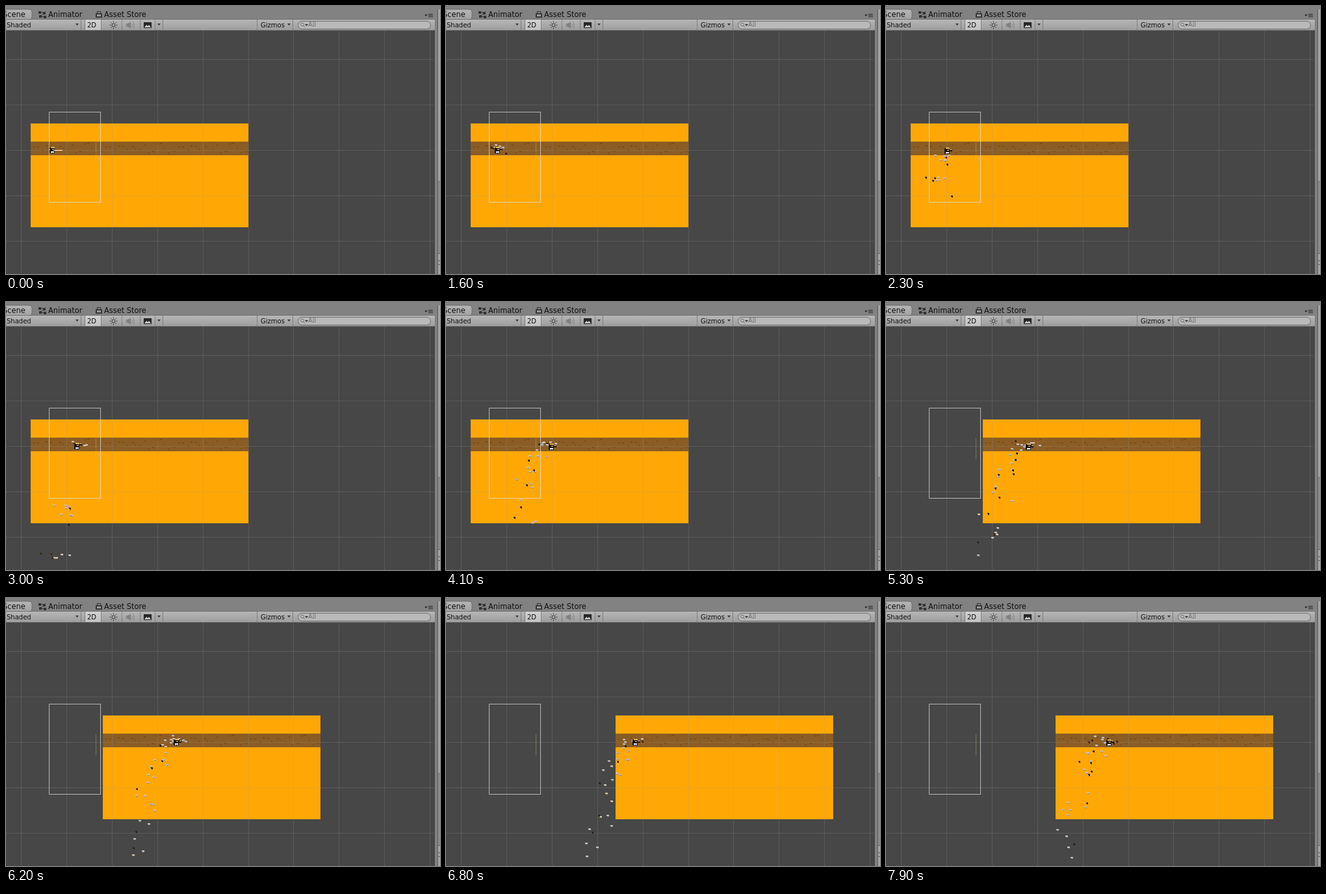
An HTML page with a canvas for the animation above (8 s loop, 668 by 413 pixels).

```html
<!DOCTYPE html>
<html lang="en">
<head>
<meta charset="utf-8">
<style>
html, body { margin: 0; width: 100%; height: 100%; overflow: hidden; background: #474747; }
canvas { display: block; }
</style>
</head>
<body>
<canvas id="stage" width="668" height="413"></canvas>
<script>
const ctx = document.getElementById('stage').getContext('2d');
const LOOP = 8000, TILE = 111.6, STONES = ['#c9c5c4', '#d9c3a4', '#c3bec5', '#4b2d12', '#cfc2b4', '#322419', '#bdb6b3'];

function rect(color, x, y, w, h) {
  ctx.fillStyle = color;
  ctx.fillRect(x, y, w, h);
}
function box(color, x, y, w, h) {
  ctx.strokeStyle = color;
  ctx.strokeRect(x + .5, y + .5, w - 1, h - 1);
}
function label(str, x, y, size, color = '#101010') {
  ctx.font = size + 'px "DejaVu Sans", sans-serif';
  ctx.fillStyle = color;
  ctx.fillText(str, x, y);
}
function shade(y, h, top, bottom) {
  const g = ctx.createLinearGradient(0, y, 0, y + h);
  g.addColorStop(0, top);
  g.addColorStop(1, bottom);
  return g;
}
function poly(color, ...pts) {
  ctx.fillStyle = color;
  ctx.beginPath();
  for (let i = 0; i < pts.length; i += 2) ctx.lineTo(pts[i], pts[i + 1]);
  ctx.fill();
}
const arrow = (x, y) => poly('#333', x, y, x + 5, y, x + 2.5, y + 3);

function random(seed) {
  return () => {
    seed = (seed * 1664525 + 1013904223) >>> 0;
    return seed / 4294967296;
  };
}

// Miner: idle, slow digging, then steady digging
function minerX(t) {
  if (t < 1.2) return 70.5;
  return t < 3 ? 70.5 + (t - 1.2) * 21.4 : 109 + (t - 3) * 47.8;
}

function makeStones() {
  const rnd = random(77), list = [];
  const burst = (time, count) => {
    for (let i = 0; i < count; i++) {
      const born = time + rnd() * .09;
      list.push({
        born,
        x: minerX(born) - 5 + rnd() * 23,
        y: 217 + rnd() * 6,
        vx: -11 + rnd() * 26,
        vy: -8 - rnd() * 36,
        color: STONES[Math.floor(rnd() * STONES.length)]
      });
    }
  };
  burst(1.25, 8);
  burst(1.62, 9);
  burst(2.7, 5);
  for (let s = 3.05; s < 8; s += .2) burst(s, 4 + Math.floor(rnd() * 2));
  return list;
}
const stones = makeStones();

const rndSpeck = random(12);
const specks = Array.from({ length: 17 }, (_, i) => [
  3 + i * 6.4 + rndSpeck() * 3, 211 + rndSpeck() * 17, rndSpeck() < .5 ? 2 : 3
]);

function drawGround(x) {
  rect('#ffa805', x, 181, 335, 160);
  rect('#8b5d24', x, 209, 335, 21);
  for (let i = 0; i < 3; i++)
    for (const [sx, sy, w] of specks)
      rect('#65431b', Math.round(x + i * TILE + sx), Math.round(sy), w, 1);
}

function drawGrid() {
  ctx.globalAlpha = .22;
  for (let i = 0; i < 10; i++) rect('#999', Math.round(23 + i * 69.9), 38, 1, 375);
  for (let i = 0; i < 5; i++) rect('#999', 0, 82 + i * 70, 660, 1);
  ctx.globalAlpha = 1;
}

function drawStone(s, t) {
  const age = t - s.born;
  if (age < 0) return;
  const x = Math.round(s.x + s.vx * age), y = Math.round(s.y + s.vy * age + 77.5 * age * age);
  if (y > 415) return;
  const dark = s.color < '#5';
  rect(s.color, x - 1, y - 1, dark ? 3 : 4, 2);
  rect(dark ? '#1d1510' : '#8f8177', x, y + 1, dark ? 2 : 3, 1);
}

function drawMiner(t) {
  const x = Math.round(minerX(t)), digging = t >= 1.2;
  const step = Math.floor(t * 10 + .01);
  const bob = digging ? step % 2 : +(t >= .3 && t < .6 || t >= .9 && t < 1);
  const y = 222 + bob;
  rect('#17130f', x - 4, y - 4, 8, 9);
  rect('#e8b93a', x - 2, y - 5, 5, 2);
  rect('#fff0a0', x + 2, y - 4, 2, 1);
  rect('#d99a63', x, y - 2, 3, 2);
  rect('#17130f', x + 1, y - 2, 1, 1);
  rect('#f4f4f4', x - 2, y + 2, 5, 2);
  rect('#4a65a5', x - 2, y + 4, 2, 1);
  rect('#4a65a5', x + 2, y + 4, 1, 1);
  if (digging) {
    const swing = step % 3;
    rect('#17130f', x + 3, y - 3 + swing, 5, 2);
    rect('#d8d8d8', x + 5, y - 4 + swing, 2, 1);
  } else {
    rect('#dedede', x - 5, y - 1, 2, 1);
    rect('#c8b05c', x + 3, y, 3, 1);
    if (t < .2) rect('#fff', x + 2, y, 14, 1);
  }
}

function drawTabs() {
  rect('#828282', 0, 0, 668, 20);
  ctx.fillStyle = shade(5, 15, '#b4b4b4', '#a5a5a5');
  ctx.beginPath();
  ctx.roundRect(-8, 5, 48, 16, 4);
  ctx.fill();
  ctx.strokeStyle = '#686868';
  ctx.stroke();
  label('Scene', -5, 17, 11.4);
  label('Animator', 65, 17, 11.4);
  label('Asset Store', 151, 17, 11.4);

  // Animator nodes
  ctx.strokeStyle = '#333';
  ctx.beginPath();
  ctx.moveTo(52, 10); ctx.lineTo(59, 10); ctx.lineTo(53, 16); ctx.lineTo(60, 17);
  ctx.stroke();
  for (const [x, y] of [[50, 8], [57, 9], [51, 14], [58, 15]]) rect('#333', x, y, 4, 4);
  // Shop bag
  rect('#3a3a3a', 138, 11, 10, 7);
  box('#3a3a3a', 140, 8, 6, 4);
  rect('#999', 140, 13, 6, 3);
  arrow(644, 13);
  for (let i = 0; i < 3; i++) rect('#333', 650, 12 + i * 2, 7, 1);
}

function drawToolbar() {
  rect(shade(20, 18, '#b8b8b8', '#9c9c9c'), 0, 20, 660, 18);
  rect('#707070', 0, 20, 660, 1);
  rect('#6b6b6b', 0, 37, 660, 1);
  rect(shade(21, 16, '#d2d2d2', '#c2c2c2'), 121, 21, 25, 16);
  for (const x of [115, 121, 146, 178, 206, 229, 241, 386, 441]) rect('#808080', x, 21, 1, 16);
  label('Shaded', 1, 33, 10);
  label('2D', 125, 33, 10);
  label('Gizmos', 392, 33, 10);
  for (const x of [107, 233, 433]) arrow(x, 27);

  // Sun
  ctx.strokeStyle = '#333';
  ctx.beginPath();
  ctx.arc(165.5, 29.5, 2.5, 0, 7);
  for (let i = 0; i < 8; i++) {
    const c = Math.cos(i * Math.PI / 4), s = Math.sin(i * Math.PI / 4);
    ctx.moveTo(165.5 + c * 4, 29.5 + s * 4);
    ctx.lineTo(165.5 + c * 6, 29.5 + s * 6);
  }
  ctx.stroke();
  // Speaker
  poly('#818181', 185, 27, 188, 27, 192, 24, 192, 35, 188, 32, 185, 32);
  ctx.strokeStyle = '#818181';
  for (const r of [3, 6]) {
    ctx.beginPath();
    ctx.arc(191.5, 29.5, r, -1, 1);
    ctx.stroke();
  }
  // Picture
  rect('#252525', 212, 25, 12, 9);
  poly('#c8c8c8', 213, 33, 216, 29, 218, 31, 220, 29, 223, 33);

  // Search
  ctx.beginPath();
  ctx.roundRect(449.5, 23.5, 204, 12, 6);
  ctx.fillStyle = '#b9b9b9';
  ctx.fill();
  ctx.strokeStyle = '#707070';
  ctx.stroke();
  ctx.beginPath();
  ctx.arc(456, 28.5, 2.5, 0, 7);
  ctx.moveTo(458, 30.5);
  ctx.lineTo(460, 33);
  ctx.stroke();
  arrow(460, 28);
  label('All', 465, 32, 10, '#707070');
}

function drawSide() {
  rect('#3b3b3b', 659, 38, 1, 375);
  rect('#828282', 660, 20, 4, 393);
  rect('#555', 664, 5, 1, 408);
  rect('#a5a5a5', 665, 5, 3, 408);
  rect('#777', 665, 270, 3, 1);
  rect('#8c8c8c', 665, 271, 3, 110);
  rect('#606060', 664, 381, 4, 1);
  rect('#606060', 664, 392, 4, 1);
  rect('#606060', 664, 398, 4, 1);
}

function draw(t) {
  rect('#474747', 0, 0, 668, 413);
  drawGround(t < 4.4 ? 38 : t < 6.7 ? 149 : 261);
  drawGrid();
  for (const s of stones) drawStone(s, t);
  drawMiner(t);
  box('rgba(225,225,225,.72)', 66, 163, 80, 140);
  rect('rgba(190,190,130,.4)', 138, 210, 1, 32);
  drawTabs();
  drawToolbar();
  drawSide();
}

const start = performance.now();
function frame() {
  const ms = (performance.now() - start) % LOOP;
  draw(Math.floor(ms / 100) / 10);
  requestAnimationFrame(frame);
}
frame();
</script>
</body>
</html>
```
